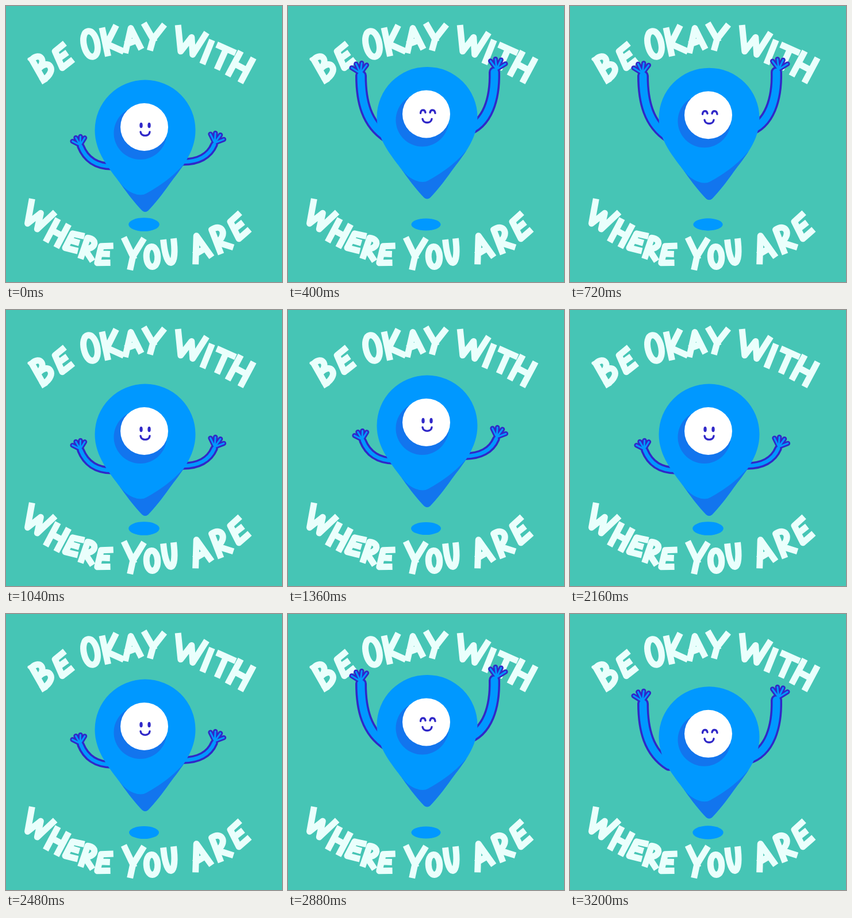
Write an HTML page that moves like this. It is 480 by 480 pixels and loops after 3280 ms.

```html
<!DOCTYPE html>
<html lang="en">
<head>
<meta charset="utf-8">
<title>Be okay with where you are</title>
<style>
html, body { margin: 0; width: 100%; height: 100%; overflow: hidden; background: #46c5b5; }
svg { display: block; width: 100vw; height: 100vh; }
path { stroke-linecap: round; stroke-linejoin: round; }
#words path { fill: none; stroke: #eafffc; stroke-width: 11; stroke-linecap: square; vector-effect: non-scaling-stroke; }
.ink { fill: none; stroke: #3028c8; stroke-width: 3.4; }
</style>
</head>
<body>
<svg viewBox="0 0 480 480" role="img" aria-label="Be okay with where you are">
  <defs>
    <path id="drop" d="M154.5 216A87.5 87.5 0 0 1 329.5 216C329.5 255 304 283 284 310C272 327 258 345 247 356Q242 360 237 356C226 345 212 327 200 310C180 283 154.5 255 154.5 216Z"/>
    <clipPath id="inside"><use href="#drop"/></clipPath>
  </defs>
  <g id="words"></g>
  <ellipse id="shadow" cx="240" cy="380" fill="#0098ff"/>
  <g id="low"></g>
  <g id="high"></g>
  <g id="pin">
    <use href="#drop" fill="#0098ff"/>
    <path clip-path="url(#inside)" fill="#1275ee" d="M310 274C288 300 262 316 244 326Q235 331 222 326C212 322 206 317 198 307L190 370H320Z"/>
    <circle cx="233.5" cy="221" r="46" fill="#1275ee"/>
    <circle cx="240.5" cy="210.5" r="41.5" fill="#fff"/>
    <g id="open" fill="#3028c8">
      <ellipse cx="235" cy="207.5" rx="2.7" ry="4.8"/>
      <ellipse cx="249" cy="207.5" rx="2.7" ry="4.8"/>
    </g>
    <path id="happy" class="ink" d="M230.5 209C231 202 238 202 239 208M247 208C248 202 255 202 256 209"/>
    <path class="ink" d="M234 219C235 227.500 249 227.500 250 219"/>
  </g>
</svg>
<script>
const $ = id => document.getElementById(id);

// Brush strokes of each letter in a box from -5 to 5
const glyphs = {
  A: 'M-5 5L0 -5L5 4M-3 2L3 1',
  B: 'M-4 -5L-5 5M-4 -5C4 -6 5 -1 -4 0C7 -2 8 5 -5 5',
  E: 'M5 -5L-4 -4L-5 5L5 4M-4 0L3 -.5',
  H: 'M-5 -5V5M5 -5V5M-5 0H5',
  I: 'M0 -5V5',
  K: 'M-5 -5V5M4 -5L-4 1L5 5',
  O: 'M0 -5C6.500 -5 6.500 5 0 5S-6.500 -5 0 -5Z',
  R: 'M-5 5L-4 -5C7 -6 7 0 -4 1L5 5',
  T: 'M-5 -5H5M0 -5V5',
  U: 'M-5 -5C-5 8 5 8 5 -5',
  W: 'M-5 -5L-2 5L.5 -2.500L2.500 5L5 -5',
  Y: 'M-5 -5L0 1M5 -5L0 1L-1 5'
};

// Letter, centre, turn, width, height
const layout = [
  ['B', 64, 105, -33, 24, 41], ['E', 98, 88, -27, 18, 35],
  ['O', 147, 66, -12, 24, 45], ['K', 184, 60, -12, 24, 40],
  ['A', 219, 57, -6, 25, 37], ['Y', 256, 54, 4, 30, 37],
  ['W', 318, 63, 15, 48, 38], ['I', 350, 80, 22, 1, 34],
  ['T', 376, 90, 24, 25, 34], ['H', 408, 106, 28, 25, 38],
  ['W', 54, 367, 30, 43, 36], ['H', 89, 395, 28, 21, 35],
  ['E', 117, 410, 24, 17, 31], ['R', 144, 421, 16, 17, 33],
  ['E', 170, 432, 10, 17, 33], ['Y', 221, 431, 3, 30, 46],
  ['O', 254, 436, -3, 20, 35], ['U', 285, 429, -6, 18, 37],
  ['A', 337, 420, -16, 27, 42], ['R', 373, 404, -24, 20, 40],
  ['E', 404, 384, -30, 19, 37]
];
$('words').innerHTML = layout.map(([c, x, y, turn, w, h]) =>
  `<path d="${glyphs[c]}" transform="translate(${x} ${y}) rotate(${turn}) scale(${w / 10} ${h / 10})"/>`).join('');

// An arm is a curve ending in a fan of fingers, drawn as outline then fill
function arm(curve, width, x, y, turn, length, side) {
  const fingers = [-55, -22, 10, 40].map(a => {
    const r = (a * side + turn) * Math.PI / 180;
    return `M${x} ${y}l${length * Math.sin(r)} ${-length * Math.cos(r)}`;
  }).join('');
  const layer = (color, armWidth, fingerWidth) =>
    `<g fill="none" stroke="${color}"><path d="${curve}" stroke-width="${armWidth}"/>` +
    `<path d="${fingers}" stroke-width="${fingerWidth}"/></g>`;
  return layer('#3028c8', width, 8.5) + layer('#0098ff', width - 7, 3);
}
$('low').innerHTML =
  arm('M130 244C138 264 155 280 188 279', 13.5, 129, 242, -8, 15, 1) +
  arm('M362 241C354 260 335 272 304 271', 13.5, 363, 238, 14, 17, -1);
$('high').innerHTML =
  arm('M127 121C127 165 136 205 172 228', 20, 126, 117, -3, 18, 1) +
  arm('M359 115C360 160 348 205 310 217', 20, 363, 110, 3, 18, -1);

const ease = u => {
  u = Math.min(1, Math.max(0, u));
  return u * u * (3 - 2 * u);
};

function draw(now) {
  const k = Math.floor(now % 3280 / 80) % 14;
  const lift = 22.6 * (ease(k / 4.9) - ease((k - 8.2) / 4.7));
  const cheer = k > 3 && k < 13;
  const move = (id, y) => $(id).setAttribute('transform', `translate(0 ${y})`);
  const show = (id, on) => $(id).setAttribute('visibility', on ? 'visible' : 'hidden');
  move('pin', -lift);
  move('low', -lift * 1.12);
  move('high', 1.85 * Math.max(0, 21 - lift));
  show('low', !cheer);
  show('open', !cheer);
  show('high', cheer);
  show('happy', cheer);
  $('shadow').setAttribute('rx', 26.8 - lift * .055);
  $('shadow').setAttribute('ry', 11.8 - lift * .055);
  requestAnimationFrame(draw);
}
draw(performance.now());
</script>
</body>
</html>
```
